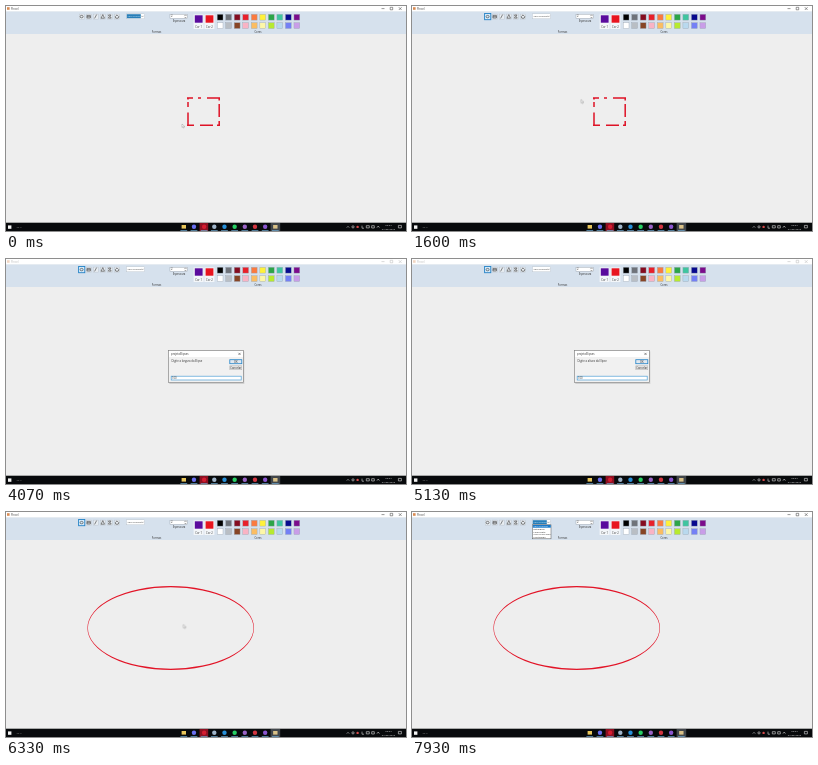
An HTML page for the animation above (8 s loop, 400 by 225 pixels).

```html
<!DOCTYPE html>
<html lang="pt">
<head>
<meta charset="utf-8">
<title>Desenho</title>
<style>
html, body { margin: 0; width: 100%; height: 100%; overflow: hidden; background: #eee; }
svg { display: block; width: 100vw; height: 100vh; }
text { font-family: "Open Sans", "Noto Sans", sans-serif; font-size: 2.7px; fill: #333; }
.mid { text-anchor: middle; }
.timed { animation: 8s step-end infinite; }
.dashed { animation-name: dashed; }
.oval { animation-name: oval; }
.dialog { animation-name: dialog; }
.window { animation-name: window; }
.width { animation-name: width; }
.height { animation-name: height; }
.tool { animation-name: tool; }
.combo { animation-name: combo; }
.menu { animation-name: menu; }
.d1 { animation-name: d1; }
.d2 { animation-name: d2; }
.d3 { animation-name: d3; }
.caret { animation-name: caret; }
.pointer { animation: move 8s ease-in-out infinite, pointer 8s step-end infinite; }
@keyframes dashed { 0% { opacity: 1 } 26.5%, 100% { opacity: 0 } }
@keyframes oval { 0% { opacity: 0 } 65.6%, 100% { opacity: 1 } }
@keyframes dialog { 0%, 53.3%, 64.8%, 100% { opacity: 0 } 27.5%, 54.1% { opacity: 1 } }
@keyframes window { 0%, 53.3%, 64.8%, 100% { opacity: 1 } 27.5%, 54.1% { opacity: .35 } }
@keyframes width { 0% { opacity: 1 } 53.3%, 100% { opacity: 0 } }
@keyframes height { 0% { opacity: 0 } 53.3%, 100% { opacity: 1 } }
@keyframes tool { 0%, 91%, 100% { opacity: 0 } 12.7% { opacity: 1 } }
@keyframes combo { 0%, 91%, 100% { opacity: 1 } 12.7% { opacity: 0 } }
@keyframes menu { 0% { opacity: 0 } 92%, 100% { opacity: 1 } }
@keyframes d1 { 0%, 53.3% { opacity: 0 } 38%, 57.5%, 100% { opacity: 1 } }
@keyframes d2 { 0%, 53.3% { opacity: 0 } 40%, 59%, 100% { opacity: 1 } }
@keyframes d3 { 0%, 53.3% { opacity: 0 } 42%, 60.5%, 100% { opacity: 1 } }
@keyframes caret { 0%, 53.3% { opacity: 1 } 34%, 38%, 57.5%, 100% { opacity: 0 } }
@keyframes pointer { 0%, 64.8% { opacity: 1 } 34%, 92%, 100% { opacity: 0 } }
@keyframes move {
  0%, 2% { transform: translate(176px, 118px) }
  10.8%, 13.5% { transform: translate(76px, 11px) }
  19.5%, 20.5% { transform: translate(169px, 93.5px) }
  25%, 34% { transform: translate(175.5px, 112.5px) }
  64%, 80% { transform: translate(177.3px, 112.5px) }
  89%, 100% { transform: translate(135px, 10px) }
}
</style>
</head>
<body>
<svg viewBox="0 0 400 225" preserveAspectRatio="none">
  <rect width="400" height="225" fill="#eee"/>
  <rect width="400" height="5.5" fill="#fff"/>
  <rect y="5.5" width="400" height="22.5" fill="#d6e1ed"/>

  <g class="timed window">
    <rect x="1" y="1.2" width="2.6" height="2.6" fill="#d98a52"/>
    <text x="5" y="3.8">Pincel</text>
    <path d="M375.5 2.6h3M384.2 1.3h2.5v2.5h-2.5zM392.8 1.2l2.8 2.8m0-2.8l-2.8 2.8" fill="none" stroke="#333" stroke-width=".5"/>
  </g>

  <g id="tools" fill="none" stroke="#444" stroke-width=".65">
    <g id="toolBoxes"></g>
    <rect class="timed tool" x="72.6" y="7.5" width="6.2" height="6.2" fill="#d3eafb" stroke="#2482c6" stroke-width=".9"/>
    <ellipse cx="75.6" cy="10.6" rx="1.5" ry="1.2"/>
    <path d="M81 9.4h3.4v2.6H81zM81 10.7h3.4M88.6 12.4l2-3.8M96.8 8.6l1.7 3.6h-3.5zM102.5 9h2.4l-.7 1.5 1 1.6h-2.8l.9-1.5zM109.2 10.7l1.8-1.8 1.8 1.8-.6 1.5h-2.4z"/>
  </g>

  <rect x="120.5" y="7.8" width="18" height="5" fill="#fff" stroke="#b6bec8" stroke-width=".4"/>
  <text x="121.5" y="11.3" font-size="2.4" style="font-size:2.4px">Sem Traçado</text>
  <g class="timed combo">
    <rect x="120.8" y="8.2" width="14" height="4" fill="#287eb8"/>
    <text x="121.5" y="11.2" style="font-size:2.4px;fill:#d9f1ff">Sem Traçado</text>
  </g>
  <path d="M136 9.8l.8.9.8-.9" fill="none" stroke="#444" stroke-width=".4"/>

  <rect x="164" y="8.2" width="17.5" height="4.2" fill="#fff" stroke="#8994a0" stroke-width=".4"/>
  <text x="165" y="11.3">2</text>
  <path d="M178.5 9.9l1-1 1 1M178.5 10.9l1 1 1-1" fill="none" stroke="#444" stroke-width=".5"/>
  <text class="mid" x="173" y="15.8">Espessura</text>
  <text class="mid" x="150.5" y="27">Formas</text>
  <text class="mid" x="252" y="27">Cores</text>
  <g id="palette"></g>

  <path class="timed dashed" d="M181 92h6M192 92h3M201 92h13M213.2 91.5v3M213.2 98v13M213.2 115v4.5M181 119.2h7M194 119.2h13M211 119.2h3M182 91.5v2M182 96v5M182 106.5v13" fill="none" stroke="#de1226" stroke-width="1.5"/>
  <path class="timed oval" fill="#e21427" fill-rule="evenodd" d="M81.4 116a83.3 42 0 0 1 166.6 0a83.3 42 0 0 1-166.6 0zM81.9 116a82.8 40.7 0 0 0 165.6 0a82.8 40.7 0 0 0-165.6 0z"/>

  <g class="timed dialog">
    <rect x="163.3" y="92.4" width="75" height="32.6" fill="#999" opacity=".35"/>
    <rect x="162.7" y="91.7" width="74.6" height="32" fill="#f1f1f1" stroke="#777" stroke-width=".6"/>
    <rect x="163" y="92" width="74" height="6" fill="#fff"/>
    <text x="165" y="96.2">projetoElipses</text>
    <path d="M232.4 93.8l2.2 2.2m0-2.2l-2.2 2.2" stroke="#333" stroke-width=".5"/>
    <text class="timed width" x="165.5" y="102.6">Digite a largura da Elipse</text>
    <text class="timed height" x="165.5" y="102.6">Digite a altura da Elipse</text>
    <rect x="223.8" y="100.7" width="12" height="4" fill="#e1e8ef" stroke="#2183c8" stroke-width=".8"/>
    <text class="mid" x="229.8" y="103.7">OK</text>
    <rect x="223.8" y="106.8" width="12" height="4" fill="#e2e2e2" stroke="#aaa" stroke-width=".4"/>
    <text class="mid" x="229.8" y="109.8">Cancelar</text>
    <rect x="165.2" y="117.2" width="70" height="3.8" fill="#fff" stroke="#4e9fd5" stroke-width=".7"/>
    <path class="timed caret" d="M166.2 117.8v2.6" stroke="#222" stroke-width=".5"/>
    <text class="timed d1" x="166" y="120.2">1</text>
    <text class="timed d2" x="167.5" y="120.2">0</text>
    <text class="timed d3" x="169" y="120.2">0</text>
  </g>

  <g class="timed menu" id="menu">
    <rect x="120.5" y="12.8" width="18.5" height="14" fill="#fff" stroke="#555" stroke-width=".5"/>
    <rect x="120.8" y="13" width="18" height="2.7" fill="#1879c9"/>
  </g>

  <rect y="216.7" width="400" height="8.3" fill="#080a0c"/>
  <rect x="2" y="219.4" width="3.4" height="3.4" fill="#f4f4f4"/>
  <text x="10.5" y="222" style="font-size:2.4px;fill:#999">22°C</text>
  <g id="taskbar"></g>
  <g fill="none" stroke="#ddd" stroke-width=".6">
    <path d="M340.8 221.6l1.2-1.2 1.2 1.2M356 219.6v2.6h2M360.3 219.7h3v2.2h-3zM365.7 219.7h2.6v2.3h-2.6zM371 221.6l1.2-1.6 1.2 1.6M392.4 219.4h3v2.5h-3z"/>
    <circle cx="347" cy="220.9" r="1.1"/>
  </g>
  <circle cx="351.6" cy="220.9" r="1.2" fill="#d64a4a"/>
  <text class="mid" x="382.5" y="220.1" style="font-size:2.5px;fill:#eee">00:04</text>
  <text class="mid" x="382.5" y="223.7" style="font-size:2.5px;fill:#eee">07/05/2023</text>

  <path class="pointer" d="M0 0v3.5l.9-.8.7 1.4.6-.3-.6-1.3h1.2z" fill="#fff" stroke="#777" stroke-width=".35"/>
</svg>
<script>
const add = (id, tag, attrs, text = "") => {
  const el = document.createElementNS("http://www.w3.org/2000/svg", tag);
  for (const key in attrs) el.setAttribute(key, attrs[key]);
  el.textContent = text;
  document.getElementById(id).append(el);
};
const box = (id, x, y, width, height, fill, more = {}) => add(id, "rect", { x, y, width, height, fill, ...more });

for (let i = 0; i < 6; i++)
  box("toolBoxes", 73.2 + i * 7.05, 8.1, 5, 5, "#e8edf2", { stroke: "#b4bdc6", "stroke-width": .4 });

[["#5a0b9d", 187.6], ["#e8151f", 198.4]].forEach(([color, x], i) => {
  box("palette", x, 8.5, 10, 14.5, "#f3f6f9");
  box("palette", x + 1.2, 9.3, 7.8, 7.4, color);
  add("palette", "text", { x: x + 5, y: 21.6, class: "mid" }, "Cor " + (i + 1));
});
[
  ["#000", "#6f737a", "#850c20", "#e8202b", "#fb7a3f", "#fff13a", "#2ca548", "#3fc5a0", "#080a8e", "#7c0c8c"],
  ["#fff", "#b9bec4", "#874526", "#f9b3c4", "#fbbd62", "#fdf7a8", "#b7ea2f", "#b9d9ee", "#7480f5", "#c99de8"]
].forEach((row, r) => row.forEach((color, i) =>
  box("palette", 211.2 + i * 8.53, 8.3 + r * 8.4, 5.8, 5.8, color, { stroke: "#9ba6b2", "stroke-width": .4 })));

["Sem Traçado", "Retângulo", "Linha Reta", "Com Traço Fino", "Pontilhado"].forEach((label, i) =>
  add("menu", "text", { x: 121.5, y: 15.3 + i * 2.7, style: `font-size:2.4px;fill:${i ? "#222" : "#fff"}` }, label));

box("taskbar", 193.6, 217, 8.6, 8, "#8c1122");
box("taskbar", 264.6, 217, 9.6, 8, "#41464b");
["#e9c65a", "#6a6ff0", "#d51c30", "#9fb4c9", "#278fd8", "#27cf63", "#9a63c6", "#d23540", "#8a55cf", "#d9c187"].forEach((color, i) => {
  const cx = 177.8 + i * 10.17;
  if (i === 0 || i === 9) box("taskbar", cx - 2.2, 219, 4.4, 3.6, color);
  else add("taskbar", "circle", { cx, cy: 220.8, r: 2.2, fill: color });
  box("taskbar", cx - 3.4, 224.3, 6.8, .7, "#6da9d2");
});
</script>
</body>
</html>
```
